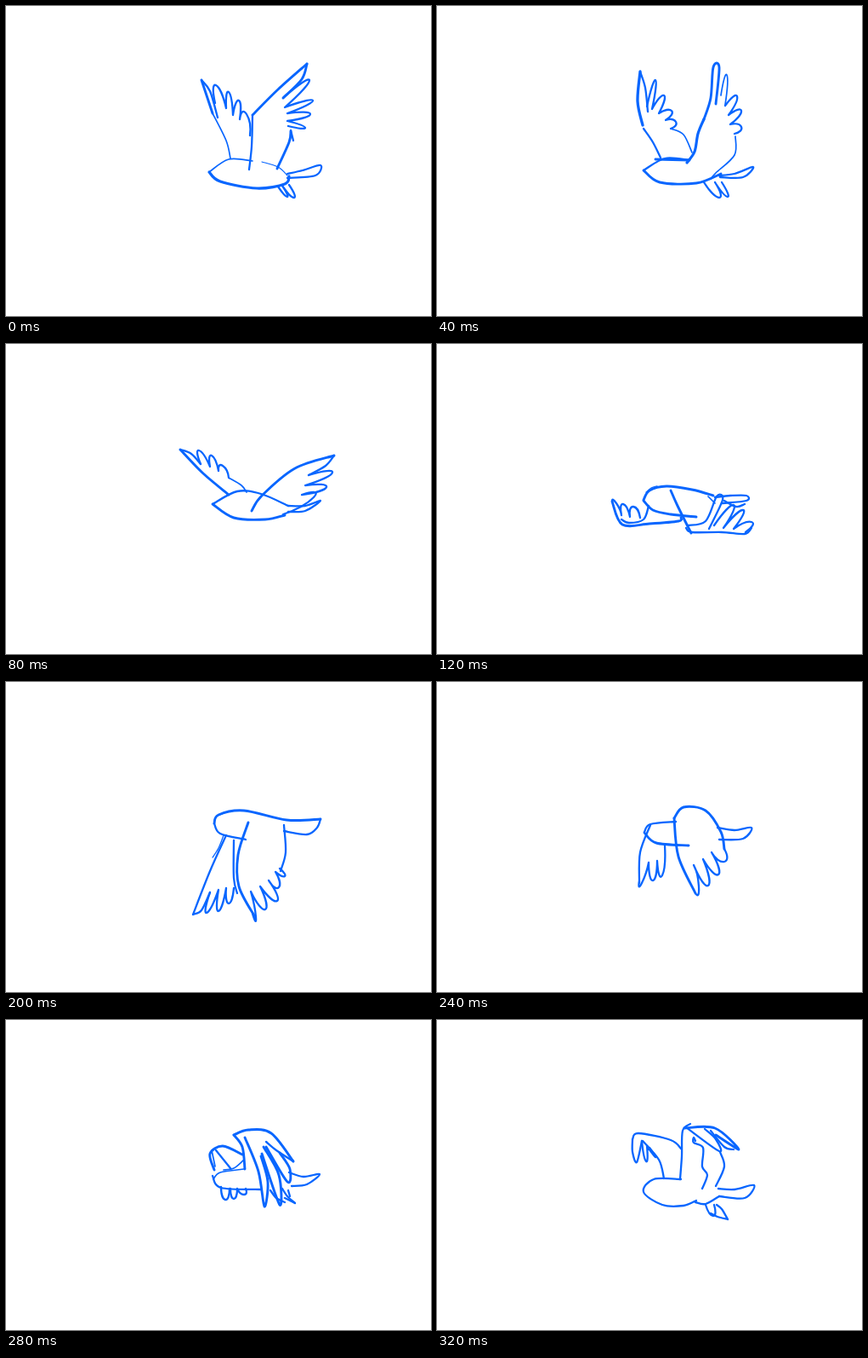
Recreate the animation shown at these times as an HTML page. Size 500 by 364 pixels, loop 360 ms.

```html
<!DOCTYPE html>
<html lang="en">
<head>
<meta charset="utf-8">
<title>Flapping bird</title>
<style>
  html, body { margin: 0; width: 100%; height: 100%; overflow: hidden; background: #fff; }
  svg { display: block; width: 100%; height: 100%; }
  path { fill: none; stroke: #0866ff; stroke-linecap: round; stroke-linejoin: round; }
</style>
</head>
<body>
<svg id="stage" viewBox="0 0 500 364"></svg>
<script>
const STEP = 40;
const THIN = 1.7, LINE = 2.3, BOLD = 2.9;
const stage = document.getElementById("stage");
let layer;

function svgNode(tag, attrs, parent) {
  const node = document.createElementNS("http://www.w3.org/2000/svg", tag);
  for (const key in attrs) node.setAttribute(key, attrs[key]);
  return parent.appendChild(node);
}

const toPoints = coords =>
  coords.flatMap((x, i) => i % 2 ? [] : [{ x, y: coords[i + 1] }]);
const mix = (p, q, k) => ({ x: p.x + (q.x - p.x) * k, y: p.y + (q.y - p.y) * k });
const shift = (p, from, to, k) => ({ x: p.x + (to.x - from.x) * k, y: p.y + (to.y - from.y) * k });
const write = p => `${p.x.toFixed(1)},${p.y.toFixed(1)}`;
const bezier = (...points) => "C" + points.map(write).join(" ");
const ink = (width, d) => svgNode("path", { d, "stroke-width": width }, layer);

// Smooth pen stroke through the given points.
function curve(width, ...coords) {
  const points = toPoints(coords);
  const at = i => points[Math.max(0, Math.min(points.length - 1, i))];
  const handle = (i, k) => shift(at(i), at(i - 1), at(i + 1), k);
  ink(width, "M" + write(points[0]) + points.slice(1).map((point, i) =>
    bezier(handle(i, 1 / 6), handle(i + 1, -1 / 6), point)).join(""));
}

// Row of rounded feathers: notch, tip, notch, tip, ... notch.
function feathers(width, ...coords) {
  const points = toPoints(coords);
  let d = "M" + write(points[0]);
  for (let i = 0; i + 2 < points.length; i += 2) {
    const [a, tip, b] = points.slice(i, i + 3);
    const root = mix(a, b, 0.5);
    d += bezier(shift(a, root, tip, 0.6), shift(tip, b, a, 0.3), tip);
    d += bezier(shift(tip, a, b, 0.3), shift(b, root, tip, 0.6), b);
  }
  ink(width, d);
}

function wingsHigh() {
  curve(THIN, 239,195, 262,180, 290,182);
  curve(1.2, 301,183, 320,189, 331,199);
  curve(3.2, 239,195, 252,206, 295,214, 328,209, 333,200);
  curve(LINE, 331,197, 349,193, 370,187, 364,199, 331,202);
  feathers(LINE, 320,212, 331,224, 325,211, 339,225, 333,210);
  curve(THIN, 264,179, 259,158, 243,126);
  curve(BOLD, 243,126, 230,87);
  curve(LINE, 230,87, 240,100, 249,131);
  feathers(LINE, 246,114, 247,93, 259,120, 262,101, 267,128, 274,111, 275,133, 283,127, 287,152);
  curve(LINE, 290,129, 289,165, 286,192);
  curve(BOLD, 290,128, 320,98, 354,68);
  curve(BOLD, 354,68, 348,86, 326,108);
  feathers(LINE, 326,108, 357,87, 328,119, 361,111, 331,126, 358,127, 331,135, 352,143, 332,141);
  curve(LINE, 335,146, 338,158);
  curve(BOLD, 335,147, 333,160, 319,191);
}

function wingsUpright() {
  curve(LINE, 297,181, 268,179, 243,193);
  curve(BOLD, 257,180, 297,181);
  curve(BOLD, 243,193, 262,207, 305,208, 334,197);
  curve(LINE, 331,199, 350,197, 372,189, 360,201, 333,201);
  curve(3.2, 294,184, 303,171, 307,150, 314,133);
  curve(BOLD, 314,133, 322,108, 325,72, 332,72, 328,115);
  feathers(THIN, 334,105, 341,81, 339,116);
  feathers(LINE, 339,117, 353,106, 343,128, 358,123, 345,139, 358,142, 350,150);
  curve(THIN, 351,153, 350,175, 328,196, 322,203);
  curve(LINE, 263,178, 254,160, 243,144);
  curve(3.3, 242,140, 236,112, 239,77);
  curve(LINE, 239,77, 245,96, 248,124);
  feathers(LINE, 247,118, 257,87, 253,121, 267,105, 261,126, 276,123, 269,134, 281,136, 275,144);
  curve(THIN, 275,144, 290,151, 300,172);
  feathers(LINE, 314,207, 332,225, 327,207, 342,224, 335,207);
}

function wingsWide() {
  curve(LINE, 243,188, 272,173, 300,176, 332,190);
  curve(BOLD, 243,188, 268,204, 305,206, 328,201);
  curve(LINE, 332,190, 352,190, 370,184, 352,196, 332,197);
  curve(BOLD, 289,196, 301,178, 340,146, 386,131);
  curve(LINE, 386,131, 376,143, 356,154);
  feathers(LINE, 356,154, 384,151, 352,166, 377,168, 348,177, 362,180, 326,200);
  curve(BOLD, 262,177, 232,152, 205,124);
  curve(LINE, 205,124, 218,129, 229,141);
  feathers(LINE, 229,141, 227,125, 240,144, 242,131, 250,149, 255,143, 262,157);
  curve(THIN, 262,157, 277,166, 283,174);
}

function wingsLevel() {
  curve(1.3, 246,174, 252,169, 259,167);
  curve(BOLD, 243,183, 250,172, 270,167, 300,171, 325,178);
  curve(BOLD, 243,184, 254,195, 275,200, 305,203);
  curve(LINE, 327,180, 345,178, 364,178, 364,184, 335,187);
  curve(THIN, 319,179, 327,187);
  curve(BOLD, 275,172, 283,190, 299,222);
  curve(LINE, 249,190, 243,206, 226,210, 217,206);
  curve(BOLD, 206,185, 218,212, 250,211, 284,208, 287,204);
  feathers(LINE, 206,185, 211,187, 217,201, 219,188, 227,203, 231,191, 239,204);
  curve(LINE, 293,216, 300,221, 335,221, 362,223, 370,216);
  curve(LINE, 295,213, 316,208, 329,179, 336,183, 320,217);
  feathers(LINE, 326,213, 349,189, 337,216, 360,195, 349,217, 370,209, 363,221);
  curve(LINE, 338,184, 352,191, 362,188);
}

function wingsLow() {
  curve(BOLD, 244,174, 251,163, 274,159, 328,171, 368,170);
  curve(LINE, 244,175, 254,187, 292,194);
  curve(LINE, 368,170, 364,178, 352,183, 328,180);
  curve(BOLD, 281,168, 286,208, 304,237, 336,254);
  feathers(LINE, 330,253, 337,252, 322,231, 346,244, 331,224, 353,232, 338,216, 354,220, 335,204);
  curve(LINE, 328,180, 334,192, 335,204);
  curve(LINE, 254,187, 232,216, 209,247);
  curve(LINE, 209,247, 220,246, 231,233);
  feathers(LINE, 231,233, 227,250, 241,235, 239,250, 251,233, 254,244, 262,224);
  curve(LINE, 262,224, 270,210, 272,193);
}

function wingsDown() {
  curve(BOLD, 245,166, 250,156, 280,151, 330,162, 370,161);
  curve(1.3, 249,157, 262,152, 272,151);
  curve(LINE, 245,166, 252,178, 282,185);
  curve(LINE, 370,161, 366,171, 354,179, 327,175);
  curve(BOLD, 285,165, 273,203, 274,240, 293,276);
  feathers(LINE, 290,272, 294,276, 288,246, 305,267, 299,240, 319,257, 309,233, 321,241, 317,223, 328,228, 322,219);
  curve(LINE, 327,168, 329,200, 323,222);
  curve(LINE, 259,180, 240,222, 220,273);
  curve(1.3, 256,180, 250,195, 243,206);
  curve(LINE, 220,273, 230,268, 240,247);
  feathers(LINE, 240,247, 236,271, 250,244, 250,269, 259,242, 262,260, 268,242);
  curve(LINE, 268,186, 268,230, 272,248);
}

function wingsFolding() {
  curve(LINE, 244,176, 251,167, 281,164);
  curve(BOLD, 244,177, 258,189, 296,192);
  curve(LINE, 330,171, 350,174, 370,171, 360,184, 332,185);
  curve(BOLD, 279,160, 290,147, 316,151, 334,176, 338,196);
  curve(BOLD, 279,160, 284,205, 304,248);
  feathers(LINE, 304,248, 308,240, 302,215, 319,239, 313,208, 331,226, 323,200, 338,211, 338,196);
  curve(LINE, 251,168, 239,200, 238,236);
  feathers(LINE, 238,234, 241,236, 249,212, 254,233, 259,210, 265,227, 268,192);
}

function wingsTucked() {
  curve(THIN, 244,187, 252,179, 280,175);
  curve(LINE, 243,183, 253,197, 300,199);
  curve(BOLD, 245,176, 240,157, 255,148, 278,158);
  curve(THIN, 242,153, 246,172);
  curve(LINE, 247,153, 264,174);
  curve(THIN, 279,165, 268,174, 256,176);
  feathers(LINE, 253,196, 258,211, 263,198);
  feathers(LINE, 264,198, 268,210, 272,198, 280,205, 282,198);
  curve(BOLD, 268,135, 285,129, 312,133, 338,166);
  curve(LINE, 338,166, 318,153, 306,143);
  curve(BOLD, 268,135, 278,149, 281,175);
  curve(BOLD, 281,138, 297,178, 304,219, 308,190, 300,160);
  curve(BOLD, 301,157, 322,217, 321,182, 303,149);
  curve(BOLD, 306,149, 331,190, 334,175, 322,156);
  curve(LINE, 333,179, 350,184, 369,181, 354,193, 336,195);
  curve(LINE, 311,200, 318,209, 328,214);
  curve(LINE, 325,198, 331,207, 340,215);
  curve(LINE, 340,215, 328,209);
  curve(LINE, 332,200, 334,207);
}

function wingsRising() {
  curve(LINE, 287,187, 255,187, 243,202, 265,217, 290,218, 305,212);
  curve(LINE, 331,198, 350,199, 373,194, 362,209, 332,207);
  curve(LINE, 304,214, 316,216, 332,207);
  feathers(LINE, 316,217, 325,230, 326,217);
  curve(LINE, 329,217, 335,222, 342,234);
  curve(LINE, 342,234, 330,231, 322,227);
  curve(LINE, 286,187, 288,160, 289,130, 298,122);
  curve(LINE, 304,142, 302,138, 302,144, 313,150, 312,172, 318,182, 312,198);
  curve(BOLD, 291,127, 327,127, 355,152, 328,135);
  curve(LINE, 293,126, 332,154, 328,140, 315,128);
  curve(LINE, 322,130, 338,149, 349,152);
  curve(LINE, 333,155, 338,172, 328,195);
  curve(LINE, 267,186, 261,164, 242,142);
  curve(LINE, 230,140, 230,155, 235,167, 241,142);
  feathers(LINE, 241,142, 246,166, 247,148, 257,161, 250,150);
  curve(LINE, 230,140, 237,133, 275,141, 287,151);
}

const poses = [wingsHigh, wingsUpright, wingsWide, wingsLevel, wingsLow,
  wingsDown, wingsFolding, wingsTucked, wingsRising];
const duration = STEP * poses.length;
const share = 1 / poses.length;

poses.forEach((draw, index) => {
  layer = svgNode("g", {}, stage);
  draw();
  layer.animate([
    { opacity: 1, offset: 0 },
    { opacity: 1, offset: share },
    { opacity: 0, offset: share },
    { opacity: 0, offset: 1 }
  ], { duration, delay: index * STEP - duration, iterations: Infinity });
});
</script>
</body>
</html>
```
